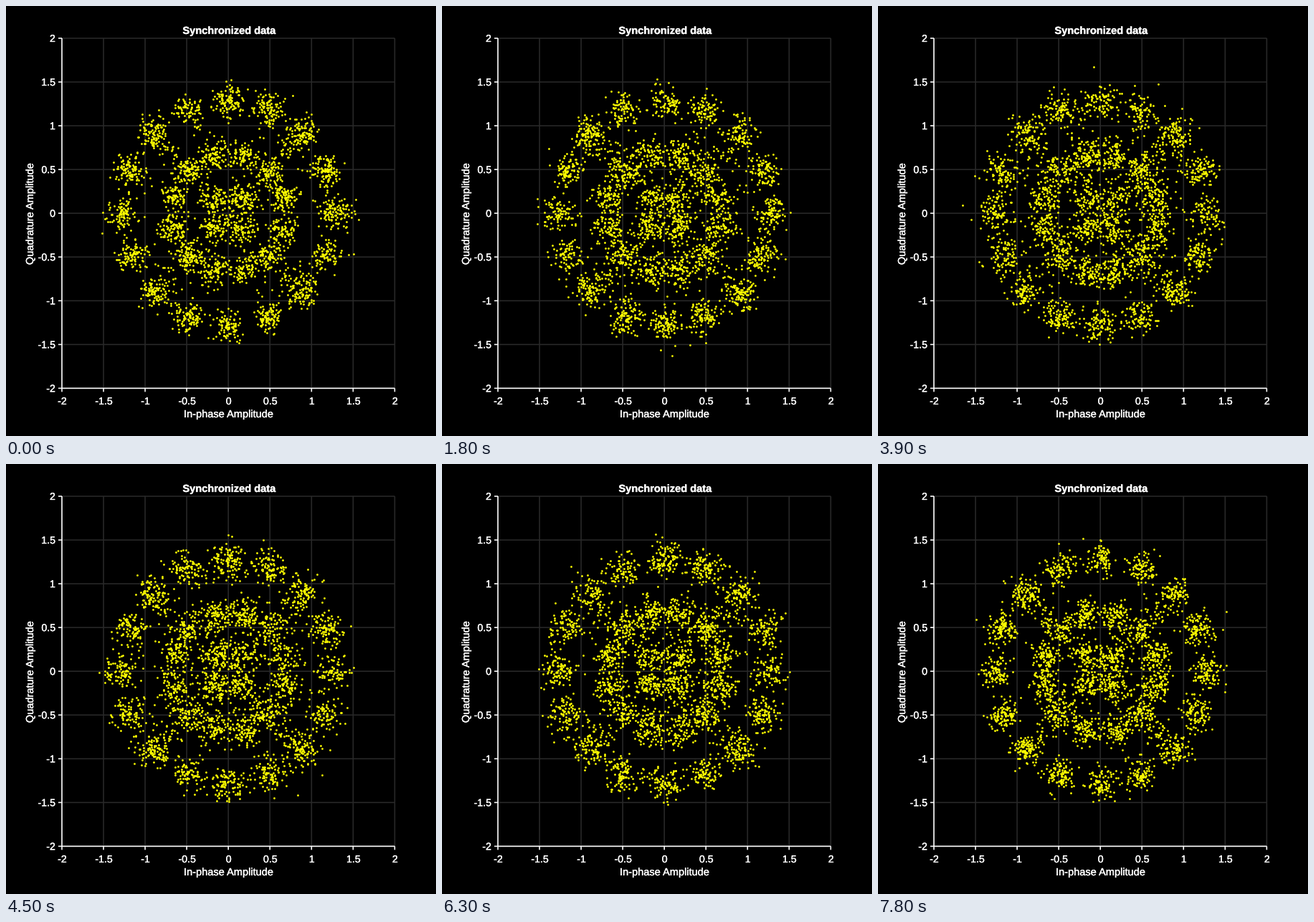
A matplotlib script for the animation above (8 s loop, 600 px wide and 600 px high).

```python
import numpy as np
import matplotlib.pyplot as plt
from matplotlib.animation import FuncAnimation
from matplotlib.patheffects import withStroke

SIZE, DPI = 600, 100
PX = 72 / DPI  # points per pixel
LEFT, RIGHT, TOP, BOTTOM = 78, 542.4, 45, 533.4
INTERVAL, HOLD, LOOP = 100, 300, 8000
GRID = "#292929"

plt.rcParams["font.family"] = "Liberation Sans"


def to_px(x, y):
    return (LEFT + (x + 2) * (RIGHT - LEFT) / 4,
            BOTTOM - (y + 2) * (BOTTOM - TOP) / 4)


def ring(radius, count, offset):
    return radius * np.exp(1j * (offset + 2 * np.pi * np.arange(count) / count))


# 32-APSK data symbols plus a short header on the unit circle
DATA = np.concatenate([ring(0.23, 4, np.pi / 4),
                       ring(0.68, 12, np.pi / 12),
                       ring(1.27, 16, 0)])
HEADER = ring(1.0, 4, np.pi / 4)


def received(burst):
    rng = np.random.default_rng(100 + burst)
    symbols = np.concatenate([rng.choice(DATA, 3150), rng.choice(HEADER, 90)])
    sigma = rng.uniform(0.092, 0.106)
    noise = rng.normal(0, sigma, (2, symbols.size))
    return to_px(symbols.real + noise[0], symbols.imag + noise[1])


fig = plt.figure(figsize=(SIZE / DPI, SIZE / DPI), dpi=DPI, facecolor="black")
ax = fig.add_axes([0, 0, 1, 1])
ax.set_xlim(0, SIZE)
ax.set_ylim(SIZE, 0)
ax.axis("off")


def line(xs, ys, color="white", z=2):
    ax.plot(xs, ys, color=color, lw=1.6 * PX, zorder=z, snap=False,
            solid_capstyle="butt")


def label(x, y, text, size=14.6, ha="center", **style):
    ax.text(x, y, text, color="white", fontsize=size * PX, ha=ha,
            va="baseline", rotation_mode="anchor",
            path_effects=[withStroke(linewidth=0.3 * PX, foreground="white")],
            **style)


for value in np.arange(-2, 2.1, 0.5):
    x, y = to_px(value, value)
    line([x, x], [TOP, BOTTOM], GRID, 1)
    line([LEFT, RIGHT], [y, y], GRID, 1)
    line([x, x], [BOTTOM, BOTTOM + 5])
    line([LEFT - 5, LEFT], [y, y])
    label(x + 0.5, 556, f"{value:g}", 14.2)
    label(69, y + 5, f"{value:g}", 14.2, ha="right")

line([LEFT, LEFT], [TOP, BOTTOM])
line([LEFT, RIGHT], [BOTTOM, BOTTOM])

label(311.5, 39, "Synchronized data", weight="bold")
label(311, 574, "In-phase Amplitude")
label(38, 289.5, "Quadrature Amplitude", rotation=90)

dots, = ax.plot([], [], "o", color="yellow", ms=2.8 * PX, mew=0, zorder=3)


def update(frame):
    dots.set_data(*received(frame * INTERVAL // HOLD))
    return dots,


anim = FuncAnimation(fig, update, frames=LOOP // INTERVAL, interval=INTERVAL,
                     repeat=True, repeat_delay=0)
plt.show()
```
